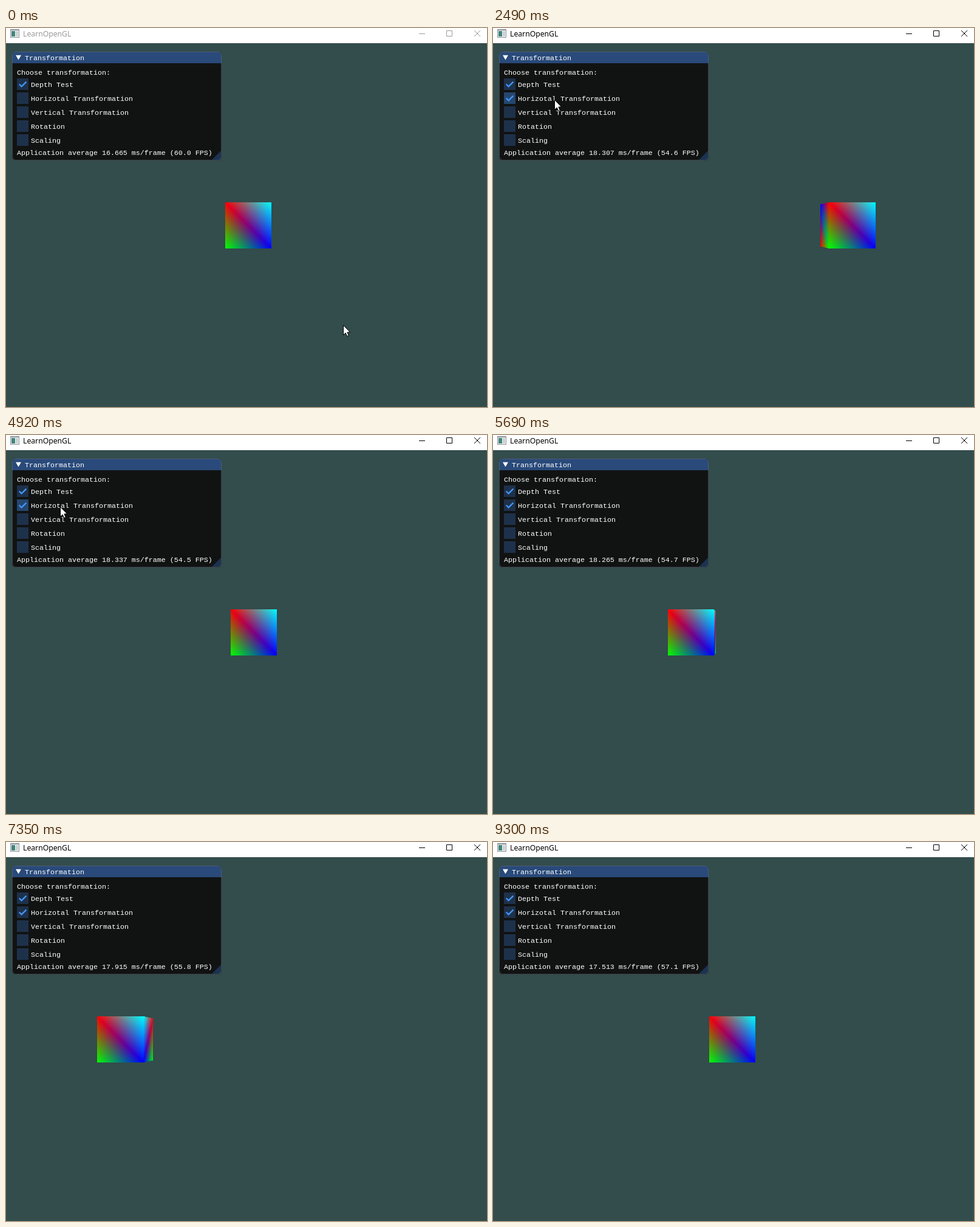
Recreate the animation shown at these times as an HTML page with a canvas. Size 792 by 624 pixels, loop 9390 ms.

```html
<!DOCTYPE html>
<html lang="en">
<head>
<meta charset="utf-8">
<title>Transformation</title>
<style>
  html, body { margin: 0; width: 100%; height: 100%; overflow: hidden; background: #334c4c; }
  canvas { display: block; }
</style>
</head>
<body>
<canvas id="stage" width="792" height="624"></canvas>
<script>
const ctx = document.getElementById('stage').getContext('2d');
const LOOP = 9390, STEPS = 120, STEP_MS = LOOP / STEPS;
const MONO = '11.667px "Liberation Mono", monospace';
const OPTIONS = ['Depth Test', 'Horizotal Transformation', 'Vertical Transformation',
  'Rotation', 'Scaling'];

const CLICK = 8;
const CUBE_START = 8.6, CUBE_SPEED = 8.24, CUBE_REACH = 228.7;
const POINTER_LEAVES = 62.5, POINTER_SPEED = 25;
const FRAME_MS = [[0, 16.665], [32, 18.307], [63, 18.337], [83, 18.193], [105, 17.637], [119, 17.513]];

const lerp = (a, b, k) => a + (b - a) * k;

// Constant speed, bouncing between -CUBE_REACH and CUBE_REACH
function cubeOffset(step) {
  const lap = 4 * CUBE_REACH;
  const travelled = Math.max(0, step - CUBE_START) * CUBE_SPEED;
  return Math.abs((travelled + 3 * CUBE_REACH) % lap - 2 * CUBE_REACH) - CUBE_REACH;
}

// Glides to the checkbox, rests, then slides out to the left
function pointerAt(step) {
  const k = Math.min(1, step / (CLICK - 1));
  const ease = k * k * (3 - 2 * k);
  const slide = Math.max(0, step - POINTER_LEAVES) * POINTER_SPEED;
  return {
    x: Math.round(lerp(555, 101, ease) - slide),
    y: Math.round(lerp(489, 118, ease))
  };
}

function frameMs(step) {
  const next = Math.max(1, FRAME_MS.findIndex(([at]) => at >= step));
  const [from, a] = FRAME_MS[next - 1], [to, b] = FRAME_MS[next];
  return lerp(a, b, (step - from) / (to - from));
}

function rect(x, y, w, h, color) {
  ctx.fillStyle = color;
  ctx.fillRect(x, y, w, h);
}

function trace(points) {
  ctx.beginPath();
  points.forEach(([x, y]) => ctx.lineTo(x, y));
}

function stroke(color, width = 1) {
  ctx.strokeStyle = color;
  ctx.lineWidth = width;
  ctx.stroke();
}

function polygon(points, color) {
  trace(points);
  ctx.closePath();
  ctx.fillStyle = color;
  ctx.fill();
}

function label(text, x, y, font = MONO, color = '#fff') {
  ctx.font = font;
  ctx.fillStyle = color;
  ctx.fillText(text, x, y);
}

function drawTitleBar(active) {
  const ink = active ? '#000' : '#999';
  rect(0, 0, 792, 25, '#fff');
  rect(7, 2, 15, 14, '#8a9096');
  rect(8, 4, 13, 11, '#f4f6f6');
  rect(9, 5, 6, 9, '#41857d');
  rect(16, 5, 4, 9, '#c9d0d3');
  label('LearnOpenGL', 28, 14, '12.2px "Noto Sans", sans-serif', ink);
  ctx.beginPath();
  ctx.moveTo(680, 9.5); ctx.lineTo(690, 9.5);
  ctx.rect(725.5, 4.5, 9, 9);
  ctx.moveTo(771, 4); ctx.lineTo(781, 14);
  ctx.moveTo(781, 4); ctx.lineTo(771, 14);
  stroke(ink);
}

function drawCheckbox(text, row, checked, hovered) {
  const x = 18, y = 83 + row * 23;
  rect(x, y, 19, 19, hovered ? '#25476f' : '#1e314b');
  if (checked) {
    trace([[x + 3.7, y + 9.5], [x + 7.6, y + 13.4], [x + 15.4, y + 5.6]]);
    stroke('#4296fa', 2.4);
  }
  label(text, x + 23, y + 14);
}

function drawPanel(step, pointer) {
  ctx.save();
  ctx.beginPath();
  ctx.roundRect(10, 39, 345, 179, 6);
  ctx.clip();
  rect(10, 39, 345, 179, '#111313');
  rect(10, 39, 345, 19, '#294a7a');
  polygon([[354, 202], [354, 217], [339, 217]], '#1b3350');
  ctx.restore();
  ctx.beginPath();
  ctx.roundRect(10.5, 39.5, 344, 178, 6);
  stroke('rgba(110,110,128,0.5)');

  polygon([[16, 44.8], [25, 44.8], [20.5, 52.6]], '#fff');
  label('Transformation', 31, 53);
  label('Choose transformation:', 18, 77);

  const hover = step >= CLICK - 1 && pointer.x >= 18;
  OPTIONS.forEach((text, row) =>
    drawCheckbox(text, row, row === 0 || (row === 1 && step >= CLICK), row === 1 && hover));

  const ms = frameMs(step);
  label(`Application average ${ms.toFixed(3)} ms/frame (${(1000 / ms).toFixed(1)} FPS)`, 18, 209);
}

// Cube of side 1 whose front face is DEPTH units from the camera
const DEPTH = 9.5, HALF = 38.12, CX = 399, CY = 325;
const frontColor = (u, v) => [1 - Math.max(u, v), Math.abs(u - v), u];
const rightColor = (s, v) => [Math.min(s, 1 - v), Math.abs(1 - s - v), 1 - s];
const leftColor = (s, v) => [Math.abs(1 - s - v), Math.min(v, 1 - s), Math.min(s, 1 - v)];
const inUnit = value => value >= 0 && value <= 1;

function cubeColor(x, y, offset) {
  const u = (x - offset + HALF) / (2 * HALF);
  const onFront = inUnit(u);
  const edge = offset + (u < 0 ? -HALF : HALF);
  const s = onFront ? 0 : DEPTH * (edge / x - 1);
  const v = (y * (1 + s / DEPTH) + HALF) / (2 * HALF);
  if (!inUnit(s) || !inUnit(v)) return null;
  if (onFront) return frontColor(u, v);
  return u < 0 ? leftColor(s, v) : rightColor(s, v);
}

function drawCube(offset) {
  const w = 116, h = 80;
  const x0 = Math.round(CX + offset - w / 2), y0 = CY - h / 2;
  const image = ctx.getImageData(x0, y0, w, h);
  for (let y = 0; y < h; y++) {
    for (let x = 0; x < w; x++) {
      const color = cubeColor(x0 + x + 0.5 - CX, y0 + y + 0.5 - CY, offset);
      if (color) image.data.set(color.map(c => c * 255), (y * w + x) * 4);
    }
  }
  ctx.putImageData(image, x0, y0);
}

function drawPointer({ x, y }) {
  ctx.save();
  ctx.translate(x + 0.5, y + 0.5);
  polygon([[0, 0], [0, 16], [3.7, 12.6], [6.2, 18], [8.8, 17], [6.4, 11.6], [11, 11.2]], '#fff');
  stroke('#000');
  ctx.restore();
}

function render(now) {
  // Step lengths are rounded down in the recording, so each begins slightly early
  const step = Math.min(STEPS - 1, Math.floor((now % LOOP + 25) / STEP_MS));
  const pointer = pointerAt(step);
  rect(0, 0, 792, 624, '#334c4c');
  drawTitleBar(step >= CLICK);
  drawCube(cubeOffset(step));
  drawPanel(step, pointer);
  if (pointer.x > 10) drawPointer(pointer);
}

let start;
function tick(now) {
  start ??= now;
  render(now - start);
  requestAnimationFrame(tick);
}
render(0);
requestAnimationFrame(tick);
</script>
</body>
</html>
```
